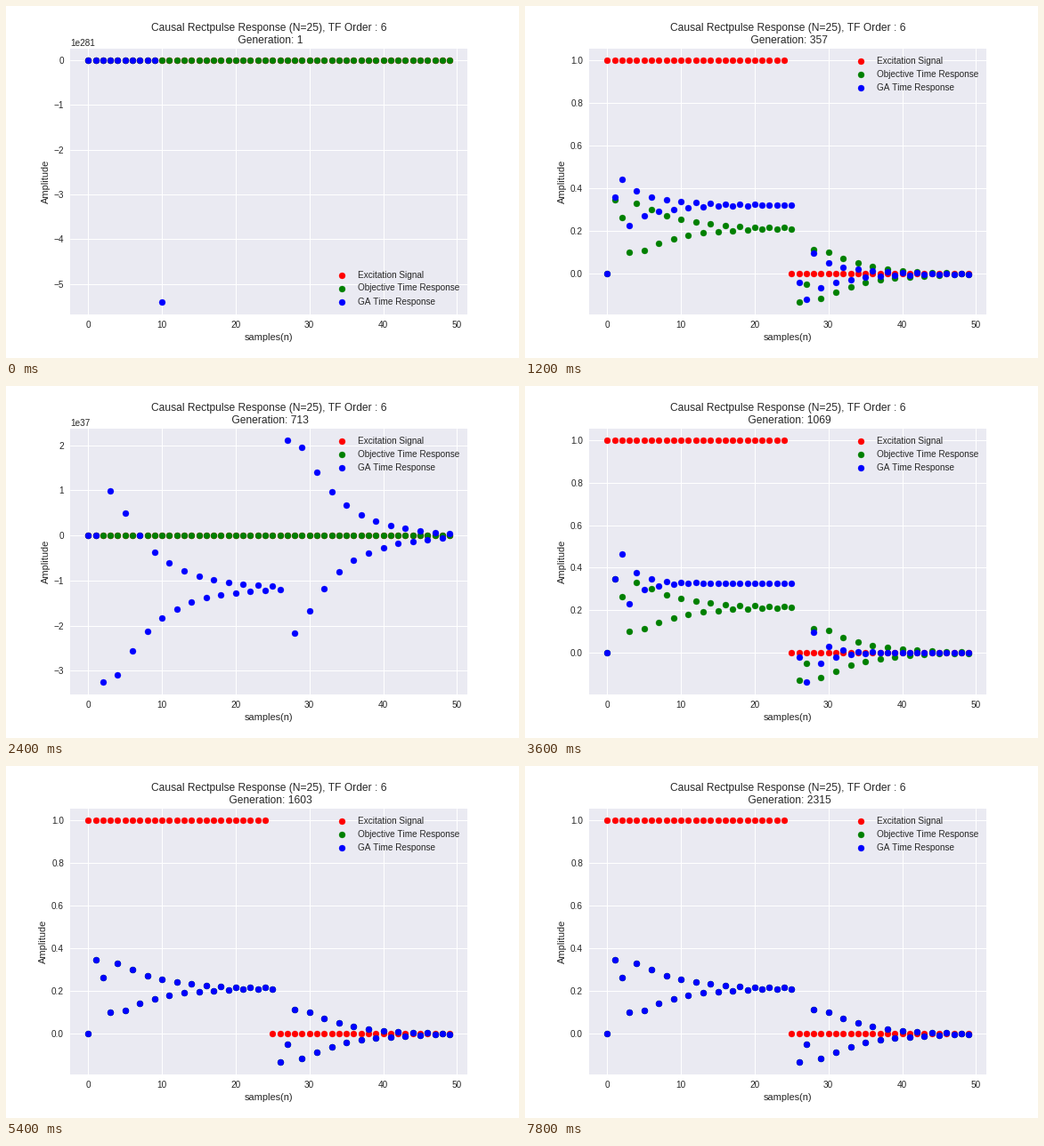
Animation, 576 px wide and 396 px high, one loop 8 s. Source, as a matplotlib script:

```python
import numpy as np
import matplotlib.pyplot as plt
from matplotlib.animation import FuncAnimation

plt.style.use("seaborn-v0_8")
plt.rcParams.update({
    "font.family": "sans-serif",
    "font.sans-serif": ["Liberation Sans"],
    "text.kerning_factor": 6,
    "figure.subplot.bottom": 0.125,
})

SAMPLES = 50
PULSE = 25
STEP_MS = 200
FRAMES = 40
HOLD = 3            # animation frames per displayed generation
GEN_STRIDE = 178

n = np.arange(SAMPLES)
excitation = (n < PULSE).astype(float)


def respond(p, q, *taps):
    """Filter the pulse through taps(z) / ((1 + p/z)(1 + q/z)), one sample late."""
    y = np.convolve(excitation, (0, *taps))[:SAMPLES]
    with np.errstate(all="ignore"):
        for i in range(1, SAMPLES):
            y[i] -= (p + q) * y[i - 1]
            if i > 1:
                y[i] -= p * q * y[i - 2]
    y[~np.isfinite(y)] = np.nan
    return y


objective = respond(.826, .3, .347, .306, -.171, .026)
unstable = respond(1e31, 0, 540)
damped = respond(.8, .3, .365, .5225, -.007, -.077, .015)
ringing = respond(.832, .43, .347, -.152, .026)
huge = 1e37 * respond(.83, .35, 0, -3.25, .4, -.03)
close = respond(.68, .3, .348, .458, -.048, -.059, .015)
between = .8 * damped + .2 * objective

# best candidate of each displayed generation; the last one stays
stages = [unstable, damped, between, ringing, huge, huge,
          close, close, close, objective]

fig, ax = plt.subplots(figsize=(8, 5.5), dpi=72)


def draw(frame):
    stage = frame // HOLD
    best = stages[min(stage, len(stages) - 1)]
    ax.clear()
    ax.scatter(n, excitation, color="red", label="Excitation Signal")
    ax.scatter(n, objective, color="green", label="Objective Time Response")
    ax.scatter(n, best, color="blue", label="GA Time Response")
    ax.set_xlabel("samples(n)")
    ax.set_ylabel("Amplitude")
    ax.set_title("Causal Rectpulse Response (N=25), TF Order : 6"
                 f"\n Generation: {1 + GEN_STRIDE * stage}")
    ax.legend(loc="lower right" if stage == 0 else "upper right")
    return []


anim = FuncAnimation(fig, draw, frames=FRAMES, interval=STEP_MS,
                     init_func=lambda: draw(0), repeat=True)
plt.show()
```
